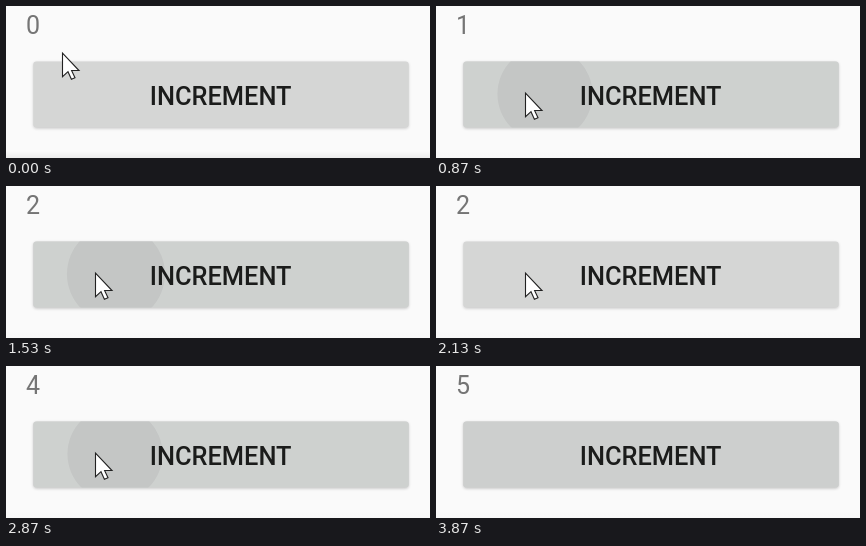
Write an HTML page that moves like this. It is 424 px wide and 152 px high and loops after 4.67 s.

```html
<!DOCTYPE html>
<html lang="en">
<head>
<meta charset="utf-8">
<title>Increment</title>
<style>
  html, body { margin: 0; width: 100%; height: 100%; overflow: hidden; background: #fafafa; }
  svg { display: block; width: 424px; height: 152px; }
  text { font-family: Roboto, sans-serif; font-size: 25px; }
  #count { fill: #757575; }
  #label { fill: #1b1c1b; font-size: 25.4px; font-weight: 500; text-anchor: middle; }
</style>
</head>
<body>
<svg viewBox="0 0 424 152">
  <defs>
    <clipPath id="face"><rect x="27.3" y="55.5" width="375.4" height="66" rx="3"/></clipPath>
    <filter id="blur" x="-5%" y="-20%" width="110%" height="140%"><feGaussianBlur stdDeviation="1.8"/></filter>
    <linearGradient id="edge" x2="0" y2="1">
      <stop stop-color="#fafafa"/><stop offset="1" stop-color="#ececec"/>
    </linearGradient>
  </defs>
  <rect width="424" height="152" fill="#fafafa"/>
  <rect id="footer" y="145" width="424" height="7" fill="url(#edge)"/>
  <text id="count" x="20" y="27.6">0</text>
  <rect id="shadow" x="27.5" y="56.5" width="375" height="66" rx="3" fill="#000" filter="url(#blur)"/>
  <g clip-path="url(#face)">
    <rect x="27" y="55" width="376" height="67" fill="#d5d6d5"/>
    <rect id="tint" x="27" y="55" width="376" height="67" fill="#cdcfce"/>
    <circle id="ripple" cy="88" fill="#c4c6c5"/>
  </g>
  <text id="label" x="214.7" y="98.6">INCREMENT</text>
  <path id="cursor" d="M.5 .5V24L6 19L9.4 26.5L13 25L9.6 17.8H17Z" fill="#fff" stroke="#222" stroke-width="1.1"/>
</svg>
<script>
const LOOP = 4670, STEP = 200 / 3;

// Steps: press start, release, fade per step
const presses = [
  [12, 14, .25],
  [21, 23, .25],
  [33, 40, .5],
  [42, 44, .5],
  [54, 54, .25]
];
const HIDE = 58, MOVE_END = 6;

const el = id => document.getElementById(id);
const set = (id, attrs) => {
  for (const key in attrs) el(id).setAttribute(key, attrs[key]);
};

function pressState(k) {
  const count = presses.filter(p => k >= p[0]).length;
  if (!count) return { count, radius: 0, alpha: 0, tint: 0 };
  const [start, release, fade] = presses[count - 1];
  const grown = Math.max(0, k - release);
  const alpha = Math.max(0, 1 - (grown * fade) ** 2);
  const held = alpha > 0 || count === presses.length;
  return {
    count,
    alpha,
    radius: 46 + Math.min(2, release - start, k - start) * 1.5 + grown * 9,
    tint: held ? Math.min(1, .75 + grown * .08) : 0
  };
}

function draw(ms) {
  const k = Math.floor((ms % LOOP + 4) / STEP);
  const s = pressState(k);
  const m = Math.min(1, k / MOVE_END);
  const ease = m * m * (3 - 2 * m);

  el('count').textContent = s.count;
  set('ripple', { r: s.radius, cx: 108 + (s.radius - 46) * .65, opacity: s.alpha });
  set('tint', { opacity: s.tint });
  set('shadow', { opacity: .2 + s.tint * .03 });
  set('footer', { opacity: s.count ? .15 : 1 });
  set('cursor', {
    transform: `translate(${56 + 33 * ease} ${46.7 + 40 * ease})`,
    visibility: k < HIDE ? 'visible' : 'hidden'
  });
}

const began = performance.now();
function tick() {
  draw(performance.now() - began);
  requestAnimationFrame(tick);
}
tick();
</script>
</body>
</html>
```
